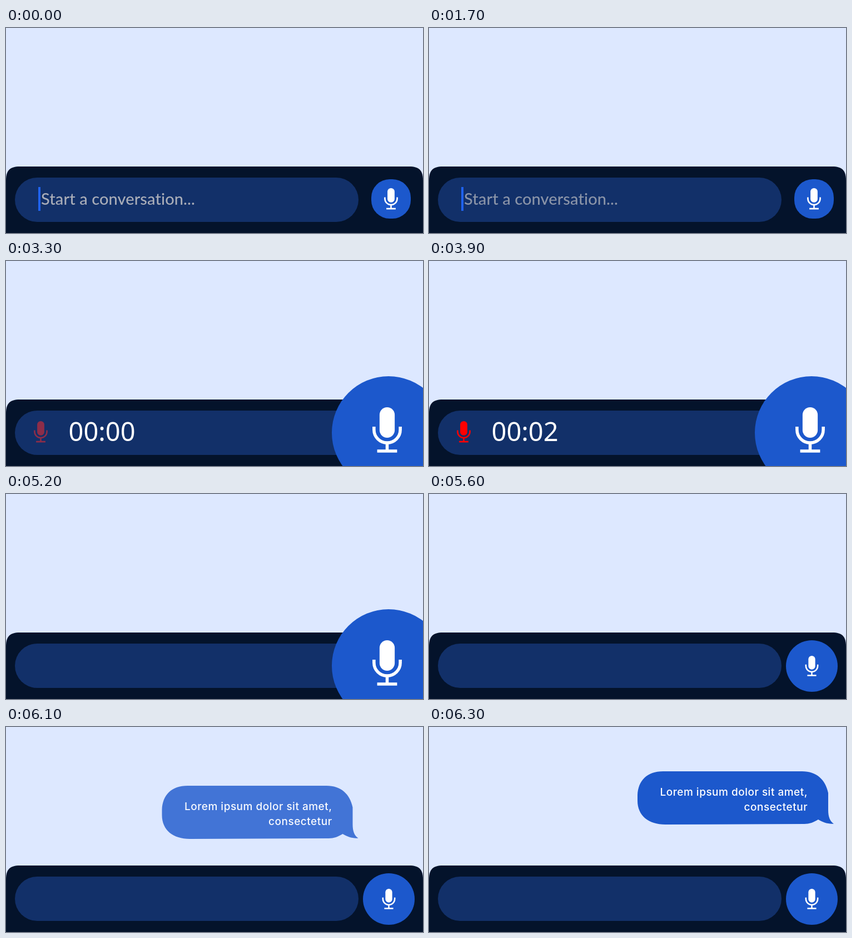
Recreate the animation shown at these times as an HTML page. Size 750 px wide and 370 px high, loop 6800 ms.

```html
<!DOCTYPE html>
<html lang="en">
<head>
<meta charset="utf-8">
<title>Voice message</title>
<style>
  html, body { margin: 0; height: 100%; overflow: hidden; }
  svg { display: block; width: 750px; height: 370px; background: #dde8ff; }
  #hint { font: 500 29px Lato, sans-serif; letter-spacing: .1px; fill: #a9adb8; }
  #timer { font: 500 47px "Noto Sans", sans-serif; fill: #fff; }
  #bubble text { font: 500 19px Inter, sans-serif; letter-spacing: .5px; fill: #fff; text-anchor: end; }
</style>
</head>
<body>
<svg viewBox="0 0 750 370">
  <defs>
    <g id="mic">
      <rect x="-6.4" width="12.8" height="25.8" rx="6.4" stroke="none"/>
      <path d="M-11.1 16.4V19a11.1 11.1 0 0 0 22.2 0V16.4M0 30V36M-8.4 37.1H8.4" fill="none" stroke-width="2.6"/>
    </g>
  </defs>
  <path d="M0 370V275C0 257 7 250 25 250H725C743 250 750 257 750 275V370Z" fill="#04132b"/>
  <rect x="16" y="270" width="618" height="80" rx="40" fill="#123069"/>
  <text id="hint" x="63" y="319">Start a conversation...</text>
  <rect id="cursor" x="58" y="287" width="4" height="43" fill="#1f62f0"/>
  <use id="recording" href="#mic"/>
  <text id="timer" x="112.5" y="325"></text>
  <rect id="button" fill="#1c58cc"/>
  <use id="buttonMic" href="#mic" fill="#fff" stroke="#fff"/>
  <g id="bubble">
    <path fill="#1c58cc" d="M421 80H671C697 80 713 95 718 119V150C718 162 721 170 728 174.5C718 175.5 708 172 700 167C692 172 684 175 675 175L425 176C395 176 375 160 375 133V123C376 97 392 80 421 80Z"/>
    <text x="681" y="124">Lorem ipsum dolor sit amet,</text>
    <text x="681" y="151">consectetur</text>
  </g>
</svg>
<script>
const LOOP = 6800, TICK = 100;
const RECORD = 1900, COUNT = 3500, STOP = 5200, SHRINK = 5600, SEND = 5800, SENT = 6300;

const el = id => document.getElementById(id);
const clamp = (v, lo = 0, hi = 1) => Math.min(hi, Math.max(lo, v));

const set = (id, attrs) => {
  for (const name in attrs) el(id).setAttribute(name, attrs[name]);
};

const setButton = (cx, cy, r, rx, micX, micY, scale) => {
  set('button', { x: cx - r, y: cy - r, width: 2 * r, height: 2 * r, rx });
  set('buttonMic', { transform: `translate(${micX} ${micY}) scale(${scale})` });
};

function draw(time) {
  const t = Math.floor(time / TICK) * TICK;
  const idle = t < RECORD;
  const recording = !idle && t < STOP;

  set('hint', { opacity: idle ? clamp(1 - (t - 1600) / 500) : 0 });
  set('cursor', { opacity: +(idle && Math.floor((t + 600) / 800) % 2 === 0) });

  // Ticks left until the recording controls have settled into place.
  const settle = clamp((RECORD - t) / TICK + 2, 0, 2);

  // The mic pulses once a second, then stays red while the timer counts.
  const counting = t >= COUNT;
  const glow = counting ? 1 : clamp(3 - (t + 200) % 1000 / 200);
  const color = `color-mix(in srgb, red ${glow * 100}%, #1a5a92)`;
  el('recording').style.fill = el('recording').style.stroke = color;
  set('recording', {
    opacity: +recording,
    transform: `translate(${62.5 + settle} ${289 + 2 * settle})`
  });
  set('timer', { opacity: +recording });
  el('timer').textContent = '00:0' + (counting ? Math.floor((t - 2300) / 800) : 0);

  if (idle) setButton(692.5, 308.5, 35.5, 33, 692.5, 289, 1);
  else if (t < SHRINK) setButton(688 - 5 * settle, 310 - 5 * settle, 102, 102, 685.5, 264, 2.13);
  else setButton(688.5, 310.5, 46.5, 46.5, 688.5, 292, .96);

  // The bubble rises in stepped moves, slowing down vertically.
  const left = Math.max(0, Math.ceil((SENT - t) / 200));
  set('bubble', {
    opacity: t < SEND ? 0 : 1 - .2 * left,
    transform: `translate(${-94.5 * left} ${26 * left ** 1.67})`
  });
}

function tick() {
  draw(performance.now() % LOOP);
  requestAnimationFrame(tick);
}
tick();
</script>
</body>
</html>
```
